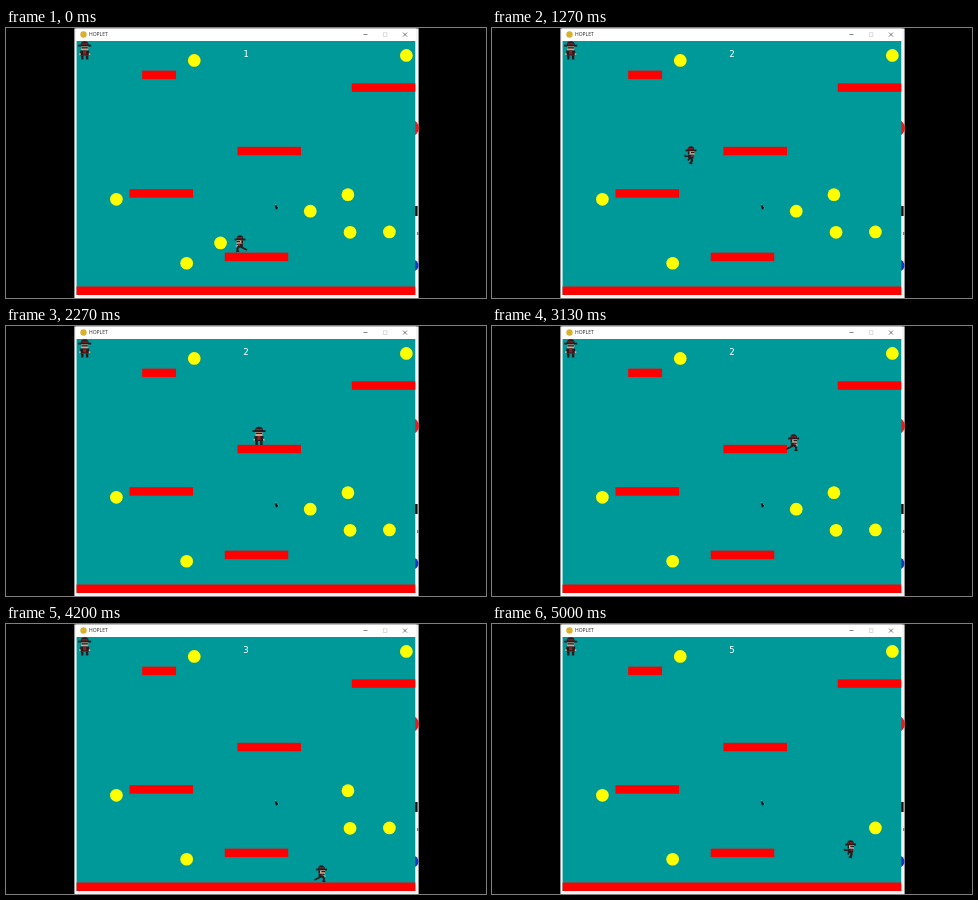
Recreate the animation shown at these times as an HTML page with a canvas. Size 480 by 270 pixels, loop 5.07 s.

```html
<!DOCTYPE html>
<html lang="en">
<head>
<meta charset="utf-8">
<title>HOPLET</title>
<style>
html, body { margin: 0; width: 100%; height: 100%; overflow: hidden; background: #000; }
canvas { display: block; width: 480px; height: 270px; }
</style>
</head>
<body>
<canvas id="stage" width="480" height="270"></canvas>
<script>
const ctx = document.getElementById('stage').getContext('2d');
const LOOP = 5070, STEPS = 76;
const GRAVITY = 970, JUMP = 417;

// The game world is 800 by 600 units, shown scaled down
const SCALE = .4233, LEFT = 70.6, TOP = 13;
const toX = u => LEFT + u * SCALE;
const toY = u => TOP + u * SCALE;

// x, y, width
const platforms = [
  [155, 70, 80], [650, 100, 150], [380, 250, 150],
  [125, 350, 150], [350, 500, 150], [0, 580, 800]
];

const coins = [
  [278, 46], [779, 34], [94, 374], [260, 525], [340, 477],
  [552, 402], [641, 363], [646, 452], [739, 451]
].map(([x, y]) => ({ x: toX(x), y: toY(y), taken: Infinity }));

// Turning points of the walk: time, x
const walk = [
  [0, 234], [700, 165], [900, 165], [1860, 253], [2530, 253], [3320, 317],
  [3600, 317], [3800, 305], [4070, 305], [4530, 342], [5070, 361]
];

// Start time, start height, upward speed, landing height
const arcs = [
  [50, 216, JUMP, 152], [1205, 152, JUMP, 110], [3010, 110, 0, 250], [4205, 250, JUMP, 250]
];

function playerX(t) {
  const i = Math.max(1, walk.findIndex(key => key[0] >= t));
  const [t0, x0] = walk[i - 1], [t1, x1] = walk[i];
  return x0 + (x1 - x0) * (t - t0) / (t1 - t0);
}

function playerY(t) {
  let y = arcs[0][1];
  for (const [start, from, speed, floor] of arcs) {
    if (t < start) break;
    const s = (t - start) / 1000;
    y = from - speed * s + GRAVITY / 2 * s * s;
    if (s > speed / GRAVITY) y = Math.min(y, floor);
  }
  return y;
}

// 15 pictures per second, starting on whole hundredths
const startOf = step => Math.round(step * 20 / 3) * 10;

// A coin is gone from the first step on which the player touches it
for (let step = 0; step < STEPS; step++) {
  const t = startOf(step), x = playerX(t), y = playerY(t);
  for (const coin of coins) {
    if (Math.abs(coin.x - x) < 17 && Math.abs(coin.y - y) < 18) coin.taken = Math.min(coin.taken, t);
  }
}

function rect(color, x, y, w, h) {
  ctx.fillStyle = color;
  ctx.fillRect(x, y, w, h);
}

function disc(color, x, y, r) {
  ctx.fillStyle = color;
  ctx.beginPath();
  ctx.arc(x, y, r, 0, Math.PI * 2);
  ctx.fill();
}

function line(color, width, ...pts) {
  ctx.strokeStyle = color;
  ctx.lineWidth = width;
  ctx.beginPath();
  pts.forEach(([x, y]) => ctx.lineTo(x, y));
  ctx.stroke();
}

function text(str, x, y, font, color, align) {
  ctx.font = font;
  ctx.textAlign = align;
  ctx.fillStyle = color;
  ctx.fillText(str, x, y);
}

const DARK = '#2b1a1c', RED = '#8c2227', SKIN = '#d2a68c';

function hat(x, y, brim) {
  ctx.fillStyle = DARK;
  ctx.beginPath();
  ctx.ellipse(x, y, brim * .62, 4, 0, Math.PI, 0);
  ctx.fill();
  rect(RED, x - brim * .5, y - 2, brim, 1.4);
  rect(DARK, x - brim, y - .6, brim * 2, 1.8);
}

function standing() {
  hat(0, -5.2, 6.5);
  rect(SKIN, -3.5, -4, 7, 4);
  rect(DARK, -3.2, -3.3, 6.4, 1.3);
  rect(DARK, -4.5, 0, 9, 5);
  rect(RED, -1.5, 0, 3, 4);
  for (const side of [-1, 1]) {
    rect(SKIN, side * 4.8 - .8, 2.8, 1.6, 1.8);
    rect(DARK, side * 2.4 - 1.2, 5, 2.4, 4);
  }
}

// Drawn facing right
function running(wide) {
  hat(0, -4.8, 5.5);
  rect(SKIN, -1.5, -3.6, 5, 3.4);
  rect(DARK, 0, -3, 3.5, 1.2);
  rect(DARK, -3, -3.6, 1.5, 3);
  rect(DARK, -2.8, -.2, 5.4, 3.8);
  rect(RED, 0, 0, 2, 2);
  if (wide) {
    line(DARK, 1.7, [-1, 3], [-4, 4.5], [-7, 6]);
    line(DARK, 1.7, [1, 3], [2.8, 4.8], [1.8, 7], [4, 7.3]);
    line(SKIN, 1.2, [2, 1.5], [4.5, 2.3]);
  } else {
    line(DARK, 2, [0, 3], [1.2, 5.5], [-.5, 8], [1.5, 8.2]);
    line(DARK, 1.7, [-1, 3], [-3, 5.5]);
    line(DARK, 1.5, [-2, 1], [-5.5, 1.5], [-6.5, 0]);
  }
}

function player(t, step) {
  const x = playerX(t), dx = playerX(t + 40) - x;
  ctx.save();
  ctx.translate(x, playerY(t));
  if (Math.abs(dx) < .2) standing();
  else {
    if (dx < 0) ctx.scale(-1, 1);
    running(step % 8 < 2 || step % 8 > 5);
  }
  ctx.restore();
}

function desktop() {
  rect('#000', 0, 0, 480, 270);
  rect('#f4f4f4', 68.4, .4, 344.2, 269.6);
  disc('#e02020', 404.5, 100, 8.5);
  disc('#1238c8', 406.5, 237.5, 6);
  rect('#111', 409, 178, 2.6, 10);
  rect('#555', 411.3, 204, 1, 3);
}

function titleBar() {
  rect('#fff', 70, .6, 340, 12.4);
  disc('#d9b12c', 77.5, 6.5, 3.2);
  text('HOPLET', 83, 8.4, '5px "Open Sans", sans-serif', '#222', 'left');
  line('#555', .7, [357.5, 6.5], [361.5, 6.5]);
  ctx.strokeStyle = '#ccc';
  ctx.strokeRect(377.3, 4.8, 3.6, 3.6);
  line('#444', .7, [397, 4.6], [401, 8.6]);
  line('#444', .7, [401, 4.6], [397, 8.6]);
}

function pointer() {
  line('#b5d5d5', 1, [269, 176.6], [272.4, 179.8]);
  line('#111', 1.8, [269.6, 177.2], [270.8, 181.2]);
  line('#111', 1.2, [269.4, 177.6], [271.8, 179.8]);
}

function draw(t, step) {
  desktop();
  titleBar();
  rect('#009999', LEFT, TOP, 800 * SCALE, 600 * SCALE);
  for (const [x, y, w] of platforms) rect('#f00', toX(x), toY(y), w * SCALE, 20 * SCALE);
  const left = coins.filter(coin => t < coin.taken);
  left.forEach(({ x, y }) => disc('#ff0', x, y, 15 * SCALE));
  ctx.save();
  ctx.translate(78.7, 22.5);
  standing();
  ctx.restore();
  player(t, step);
  const score = 1 + coins.length - left.length;
  text(score, 240, 28.6, '9px "DejaVu Sans Mono", monospace', '#fff', 'center');
  pointer();
}

const origin = performance.now();

function frame() {
  const t = (performance.now() - origin) % LOOP;
  let step = Math.min(STEPS - 1, Math.round(t * 3 / 200));
  if (startOf(step) > t) step--;
  draw(startOf(step), step);
  requestAnimationFrame(frame);
}
frame();
</script>
</body>
</html>
```
